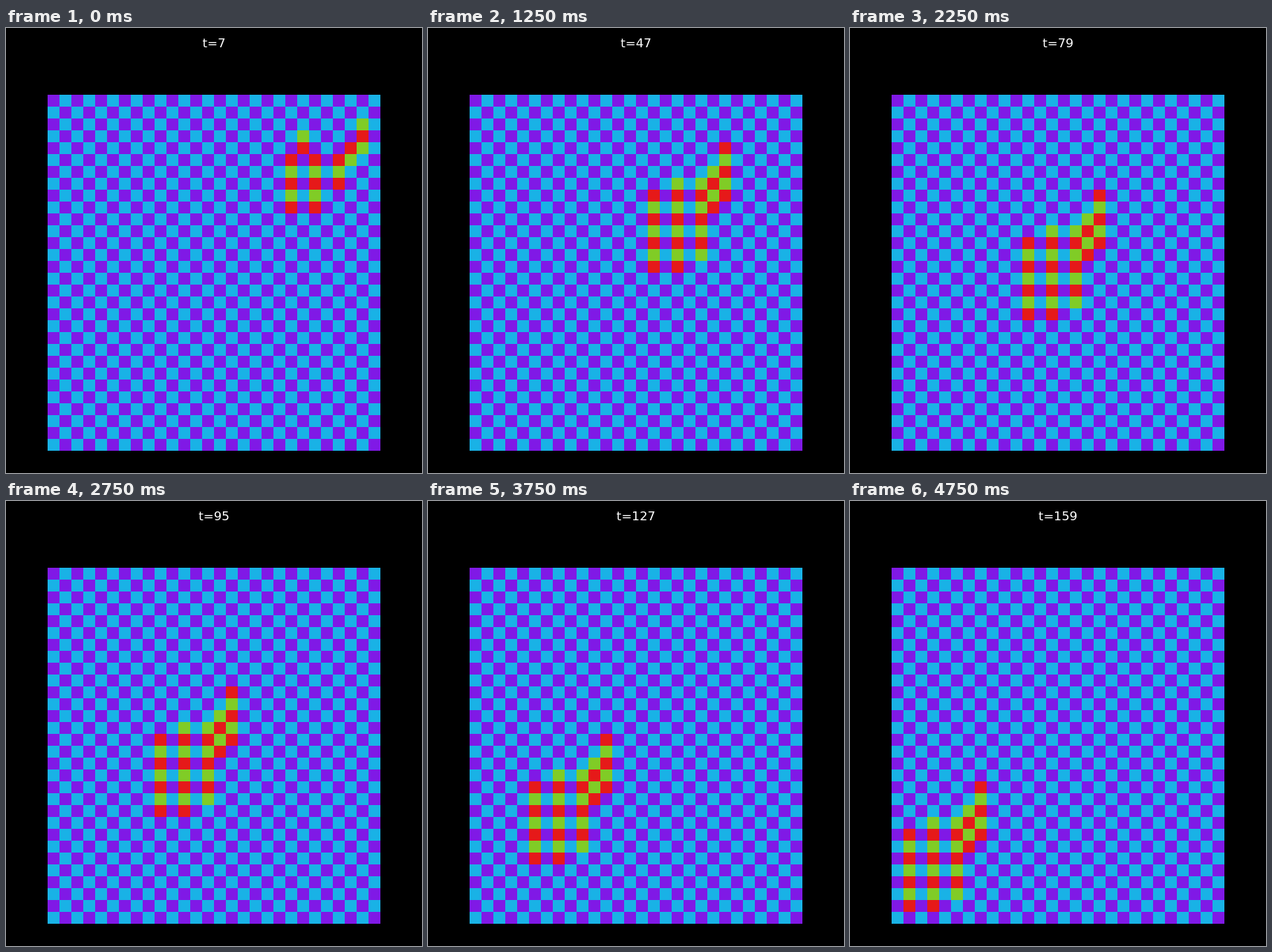
Recreate the animation shown at these times as an HTML page with a canvas. Size 560 by 600 pixels, loop 5 s.

```html
<!DOCTYPE html>
<html lang="en">
<head>
<meta charset="utf-8">
<title>Cellular automaton</title>
<style>
  html, body { margin: 0; width: 100%; height: 100%; overflow: hidden; background: #000; }
  canvas { display: block; }
</style>
</head>
<body>
<canvas width="560" height="600"></canvas>
<script>
const ctx = document.querySelector('canvas').getContext('2d');
const CELL = 16, LEFT = 56, TOP = 90, COLS = 28, ROWS = 30;
const STEP_MS = 250, STEPS = 20;

// Colours by checkerboard parity (even, odd).
const DEAD = ['#8019e6', '#19b2e6'];
const ALIVE = ['#80cc26', '#e61919'];

// Vertical runs of living cells: [column, first row, last row].
const SEED = [[20, 5, 9], [21, 3, 4], [22, 5, 9], [24, 5, 7], [25, 4, 5], [26, 2, 4]];
const SHIP = [[20, 3, 9], [22, 2, 9], [24, 2, 8], [25, 1, 4], [26, -1, 3]];

function paintCell(col, row, colors) {
  ctx.fillStyle = colors[(col + row) & 1];
  ctx.fillRect(LEFT + col * CELL, TOP + row * CELL, CELL, CELL);
}

function draw(step) {
  ctx.fillStyle = '#000';
  ctx.fillRect(0, 0, 560, 600);

  for (let row = 0; row < ROWS; row++)
    for (let col = 0; col < COLS; col++) paintCell(col, row, DEAD);

  // The seed grows into a ship that glides one cell down-left per step.
  for (const [col, first, last] of step ? SHIP : SEED)
    for (let row = first; row <= last; row++) paintCell(col - step, row + step, ALIVE);

  ctx.fillStyle = '#fff';
  ctx.font = '16.667px "DejaVu Sans", sans-serif';
  ctx.textAlign = 'center';
  ctx.fillText('t=' + (7 + 8 * step), 280, 26);
}

const start = performance.now();
let shown = -1;

function tick() {
  const step = Math.floor((performance.now() - start) / STEP_MS) % STEPS;
  if (step !== shown) draw(shown = step);
  requestAnimationFrame(tick);
}
tick();
</script>
</body>
</html>
```
